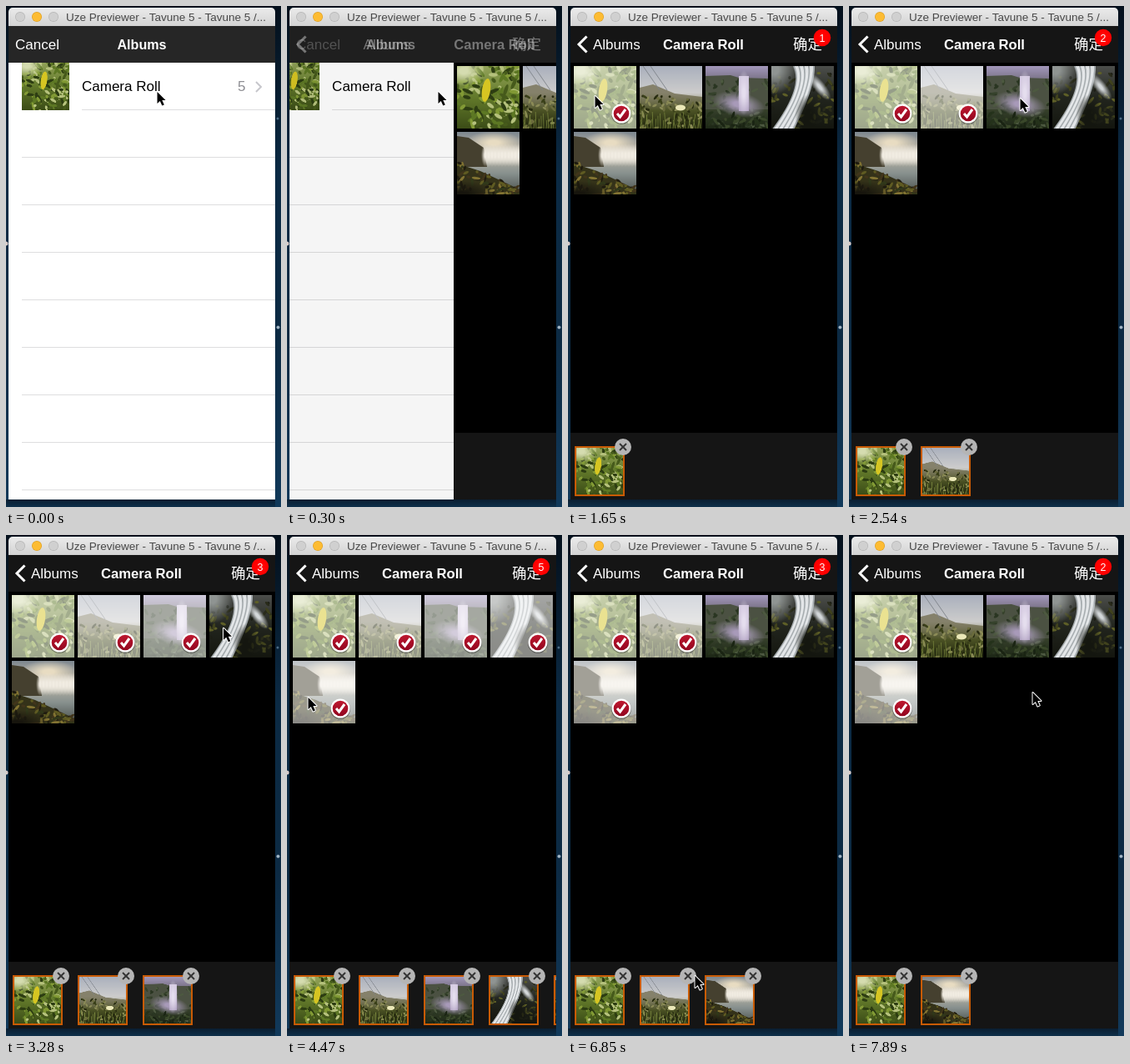
Animation, 330 px wide and 601 px high, one loop 8000 ms. Source, as an HTML page with a canvas:

```html
<!DOCTYPE html>
<html lang="en">
<head>
<meta charset="utf-8">
<title>Photo picker</title>
<style>
  html, body { margin: 0; width: 100%; height: 100%; overflow: hidden; background: #081827; }
  canvas { display: block; width: 330px; height: 601px; }
</style>
</head>
<body>
<canvas id="stage"></canvas>
<script>
const LOOP = 8000, STEP = 148.9;
const SANS = '"Liberation Sans", Arial, sans-serif';
const CJK = '"Noto Sans CJK SC", "Noto Sans CJK", sans-serif';
const canvas = document.getElementById('stage');
const ctx = canvas.getContext('2d');
const ratio = window.devicePixelRatio || 1;
canvas.width = 330 * ratio;
canvas.height = 601 * ratio;

// Where the pointer stops, and which photo it toggles there; times are in steps.
const stops = [
  { arrive: 0, x: 181, y: 102 },
  { arrive: 4, x: 181, y: 117 },
  { arrive: 9, x: 32, y: 107, tap: 10.3, photo: 0 },
  { arrive: 14, x: 118, y: 110, tap: 14.3, photo: 1 },
  { arrive: 17, x: 205, y: 110, tap: 18.6, photo: 2 },
  { arrive: 23, x: 279, y: 111, tap: 22.95, photo: 3 },
  { arrive: 29, x: 25, y: 194, tap: 28.6, photo: 4 },
  { arrive: 35, x: 291, y: 528, tap: 36.97, photo: 3 },
  { arrive: 40, x: 213, y: 528, tap: 41.7, photo: 2 },
  { arrive: 46, x: 152, y: 528, tap: 48.3, photo: 1 },
  { arrive: 53, x: 220, y: 188 }
];

/* ---------- drawing helpers ---------- */
function rect(g, color, x, y, w, h) {
  g.fillStyle = color;
  g.fillRect(x, y, w, h);
}
function oval(g, color, x, y, rx, ry = rx, turn = 0) {
  g.fillStyle = color;
  g.beginPath();
  g.ellipse(x, y, rx, ry, turn, 0, 7);
  g.fill();
}
function trace(g, pts) {
  g.beginPath();
  for (let i = 0; i < pts.length; i += 2) g.lineTo(pts[i], pts[i + 1]);
}
function poly(g, color, ...pts) {
  trace(g, pts);
  g.fillStyle = color;
  g.fill();
}
function line(g, color, width, ...pts) {
  trace(g, pts);
  g.strokeStyle = color;
  g.lineWidth = width;
  g.stroke();
}
function text(str, x, y, font, color, align = 'left') {
  ctx.font = font;
  ctx.fillStyle = color;
  ctx.textAlign = align;
  ctx.fillText(str, x, y);
}
function vertical(g, y0, y1, ...colors) {
  const fill = g.createLinearGradient(0, y0, 0, y1);
  colors.forEach((c, i) => fill.addColorStop(i / (colors.length - 1), c));
  return fill;
}
function faded(alpha, draw) {
  ctx.save();
  ctx.globalAlpha = Math.max(0, Math.min(1, alpha));
  draw();
  ctx.restore();
}

/* ---------- photos, each painted on a 75 x 75 square ---------- */
function random(seed) {
  return () => (seed = seed * 16807 % 2147483647) / 2147483647;
}
// Scatters blots below a line that falls from left to right.
function scatter(g, colors, top, slope = 0, size = 4, count = 90) {
  const rnd = random(71 + top);
  for (let i = 0; i < count; i++) {
    const x = rnd() * 75, edge = top + slope * x;
    const y = edge + rnd() * (78 - edge);
    oval(g, colors[i % colors.length], x, y, size * (.4 + rnd()), size * .4, rnd() * 3.2);
  }
}
function glow(g, color, x, y, rx, ry, turn = 0) {
  g.save();
  g.translate(x, y);
  g.rotate(turn);
  g.scale(rx, ry);
  const fill = g.createRadialGradient(0, 0, .2, 0, 0, 1);
  fill.addColorStop(0, color);
  fill.addColorStop(1, color + '00');
  oval(g, fill, 0, 0, 1);
  g.restore();
}
const painters = [
  g => { // foliage with one yellow leaf
    rect(g, vertical(g, 0, 75, '#93a35a', '#62792a', '#3c4d17'), 0, 0, 75, 75);
    scatter(g, ['#465a1b', '#829a35', '#b5c17c', '#5d7824', '#2d3d12'], 0, 0, 5.5, 150);
    glow(g, '#d5dcb0', 8, 6, 26, 18);
    oval(g, '#d6c522', 35, 29, 5, 14, .15);
  },
  g => { // meadow with a pale flower
    rect(g, vertical(g, 0, 40, '#aab0bd', '#d6d4d0'), 0, 0, 75, 75);
    poly(g, '#85816b', 0, 26, 16, 22, 42, 33, 75, 37, 75, 75, 0, 75);
    rect(g, vertical(g, 32, 75, '#66663f00', '#4b5224', '#20260e'), 0, 32, 75, 43);
    scatter(g, ['#6b6c3d', '#3a4019', '#8b8b57', '#272b10'], 32, .1, 3.5);
    for (let x = 1; x < 75; x += 3) line(g, '#7d8a3f', .7, x, 75, x + 3 * Math.sin(x), 60 + 5 * Math.sin(x * 5));
    for (const x of [4, 13]) line(g, '#7d8289', .7, x, 0, x + 20, 29);
    oval(g, '#ebe8b8', 49, 50, 6, 3.5);
  },
  g => { // waterfall in a green valley
    rect(g, vertical(g, 0, 75, '#a398bb', '#655f6c', '#39432d', '#1d2716'), 0, 0, 75, 75);
    poly(g, '#4b5142', 0, 12, 30, 11, 40, 14, 75, 15, 75, 52, 0, 52);
    scatter(g, ['#36422c', '#4d5940', '#2a3622'], 18);
    glow(g, '#a89ab9', 40, 46, 32, 15, .2);
    rect(g, vertical(g, 12, 54, '#d3c8e0', '#b5a7c6'), 40, 12, 12, 42);
    glow(g, '#e5deee', 46, 32, 8, 27);
    scatter(g, ['#25321b', '#3a482a', '#1a2413'], 54, .12, 4, 50);
  },
  g => { // rushing water between mossy rocks
    rect(g, vertical(g, 0, 75, '#4c4e4b', '#22251e', '#14160f'), 0, 0, 75, 75);
    scatter(g, ['#1c1e15', '#40421d', '#292b1a', '#5e5f27'], 8);
    glow(g, '#8f9492', 4, 4, 24, 30);
    for (let i = 0; i < 13; i++) {
      g.beginPath();
      g.moveTo(27 + 2 * i, 0);
      g.quadraticCurveTo(40 + i, 25, 2 + 2 * i, 76);
      g.strokeStyle = i % 3 ? '#e4e7e9' : '#a5abae';
      g.lineWidth = 2;
      g.stroke();
    }
    glow(g, '#d4d8da', 58, 25, 20, 7, .9);
    glow(g, '#14160f', 44, 60, 16, 26);
  },
  g => { // falls behind a mossy shore
    rect(g, vertical(g, 0, 75, '#7d8790', '#c3bba9', '#87908e', '#49504b'), 0, 0, 75, 75);
    glow(g, '#e8dcc2', 44, 13, 34, 14);
    poly(g, '#45402f', 0, 5, 14, 7, 32, 19, 36, 42, 0, 42);
    for (let x = 34; x < 75; x += 4) glow(g, '#f1ece2', x, 28, 5, 14);
    poly(g, '#343219', 0, 38, 28, 47, 75, 69, 75, 75, 0, 75);
    scatter(g, ['#5f5b22', '#1f1c10', '#41351b', '#30381a', '#827332'], 36, .43, 4);
    glow(g, '#17150d', 5, 75, 40, 16);
  }
];
const photos = painters.map(paint => {
  const tile = document.createElement('canvas');
  tile.width = tile.height = 150;
  const g = tile.getContext('2d');
  g.scale(2, 2);
  paint(g);
  return tile;
});

/* ---------- screen parts ---------- */
function desktop() {
  rect(ctx, vertical(ctx, 0, 601, '#04101c', '#0b2a44', '#0c2a43', '#11395a'), 0, 0, 330, 601);
  rect(ctx, vertical(ctx, 592, 601, '#0a1e31', '#0e2f4a'), 0, 592, 323, 9);
  oval(ctx, '#d8c9c6', 0, 285, 2.5);
  oval(ctx, '#9fb2c2', 326.5, 385.5, 2);
  oval(ctx, '#4c6b84', 326, 135, 1.5);
}
function titleBar() {
  ctx.beginPath();
  ctx.roundRect(3, 2, 320, 22, [5, 5, 0, 0]);
  ctx.fillStyle = vertical(ctx, 2, 24, '#ebebeb', '#d3d3d3');
  ctx.fill();
  ['#d0d0d0', '#fdbc33', '#d0d0d0'].forEach((color, i) => {
    oval(ctx, i === 1 ? '#dfa023' : '#b5b5b5', 17 + 20 * i, 13, 6);
    oval(ctx, color, 17 + 20 * i, 13, 5.3);
  });
  text('Uze Previewer - Tavune 5 - Tavune 5 /...', 72, 18, '13.5px ' + SANS, '#484848');
}
function albumList(dx) {
  ctx.save();
  ctx.translate(dx, 0);
  rect(ctx, '#fff', 3, 68, 320, 524);
  ctx.drawImage(photos[0], 19, 67, 57, 57.5);
  text('Camera Roll', 91, 102, '17px ' + SANS, '#000');
  text('5', 278, 102, '17px ' + SANS, '#8e8e93');
  line(ctx, '#c7c7cc', 2, 300, 91, 306, 97, 300, 103);
  for (let i = 0; i < 9; i++) {
    const x = i ? 19 : 91;
    rect(ctx, '#dededf', x, 124 + 57 * i, 323 - x, 1);
  }
  ctx.restore();
}
function checkMark(x, y) {
  oval(ctx, 'rgba(0,0,0,.3)', x, y + 1, 12);
  oval(ctx, '#fff', x, y, 11.5);
  oval(ctx, vertical(ctx, y - 9, y + 9, '#bd1830', '#93061f'), x, y, 9.3);
  line(ctx, '#fff', 3, x - 5, y, x - 1.5, y + 4, x + 5, y - 5);
}
function thumbnail(photo, slot) {
  const x = 8 + 78 * slot;
  rect(ctx, '#c95b05', x, 528, 60, 60);
  ctx.drawImage(photos[photo], x + 2, 530, 56, 56);
  oval(ctx, '#b5b5b5', x + 58, 529, 10);
  for (const d of [4, -4]) line(ctx, '#353535', 2, x + 58 - d, 525, x + 58 + d, 533);
}
function cameraRoll(dx, selected) {
  ctx.save();
  ctx.translate(dx, 0);
  rect(ctx, '#000', 3, 68, 320, 444);
  rect(ctx, '#151515', 3, 512, 320, 80);
  photos.forEach((photo, i) => {
    const x = 7 + 79 * (i % 4), y = 72 + 79 * Math.floor(i / 4);
    ctx.drawImage(photo, x, y, 75, 75);
    if (selected.includes(i)) {
      rect(ctx, 'rgba(255,255,255,.5)', x, y, 75, 75);
      checkMark(x + 57, y + 57);
    }
  });
  selected.forEach(thumbnail);
  ctx.restore();
}
function navBar(p) {
  const shade = Math.round(38 - 17 * p);
  rect(ctx, `rgb(${shade},${shade},${shade})`, 3, 24, 320, 44);
  faded(1 - 2 * p, () => text('Cancel', 11, 52, '17px ' + SANS, '#fff'));
  faded(1 - 1.5 * p, () => text('Albums', 163 - 100 * p, 52, 'bold 16.1px ' + SANS, '#fff', 'center'));
  faded(p, () => {
    line(ctx, '#fff', 3, 22.5, 36.5, 13, 46, 22.5, 55.5);
    text('Albums', 30 + 100 * (1 - p), 52, '17px ' + SANS, '#fff');
    text('Camera Roll', 162.5 + 140 * (1 - p), 52, 'bold 16.6px ' + SANS, '#fff', 'center');
    text('确定', 270, 52, '300 17.5px ' + CJK, '#fff');
  });
}
function badge(count, scale) {
  ctx.save();
  ctx.translate(305, 38);
  ctx.scale(scale, scale);
  oval(ctx, '#f00', 0, 0, 10.2);
  text(count, 0, 4.5, '12.5px ' + SANS, '#fff', 'center');
  ctx.restore();
}
function pointer(step) {
  const next = Math.max(1, stops.findIndex(stop => stop.arrive >= step));
  const from = stops[next - 1], to = stops[next];
  const dx = to.x - from.x, dy = to.y - from.y;
  // long trips take four steps, short ones two; both ease out
  const travel = Math.hypot(dx, dy) > 100 ? 4 : 2;
  const left = Math.min(1, (to.arrive - step) / travel) ** 2;
  ctx.save();
  ctx.translate(to.x - dx * left + .5, to.y - dy * left + 1);
  trace(ctx, [0, 0, 0, 14, 3.3, 11, 5.8, 16.5, 8.3, 15.4, 5.8, 10, 10, 10]);
  ctx.closePath();
  ctx.strokeStyle = '#fff';
  ctx.lineWidth = 2;
  ctx.lineJoin = 'round';
  ctx.stroke();
  ctx.fillStyle = '#000';
  ctx.fill();
  ctx.restore();
}

function draw(step) {
  let selected = [], scale = 1;
  for (const { tap, photo } of stops.filter(stop => stop.tap <= step)) {
    selected = selected.includes(photo) ? selected.filter(i => i !== photo) : [...selected, photo];
    scale = 1 + .7 * Math.exp(-6 * (step - tap));
  }
  // the new page slides in and settles exponentially
  const slide = step < 2 ? 320 : Math.round(320 * Math.exp(-1.95 * (step - 1.75)));
  const p = 1 - slide / 320;

  ctx.setTransform(ratio, 0, 0, ratio, 0, 0);
  desktop();
  titleBar();
  ctx.save();
  ctx.beginPath();
  ctx.rect(3, 24, 320, 568);
  ctx.clip();
  if (slide) {
    albumList(-96 * p);
    rect(ctx, `rgba(0,0,0,${.1 * p})`, 3, 68, 320, 524);
  }
  cameraRoll(slide, selected);
  navBar(p);
  if (selected.length) badge(selected.length, scale);
  ctx.restore();
  pointer(step);
}

function tick() {
  draw(Math.floor((performance.now() % LOOP + 5) / STEP));
  requestAnimationFrame(tick);
}
tick();
</script>
</body>
</html>
```
